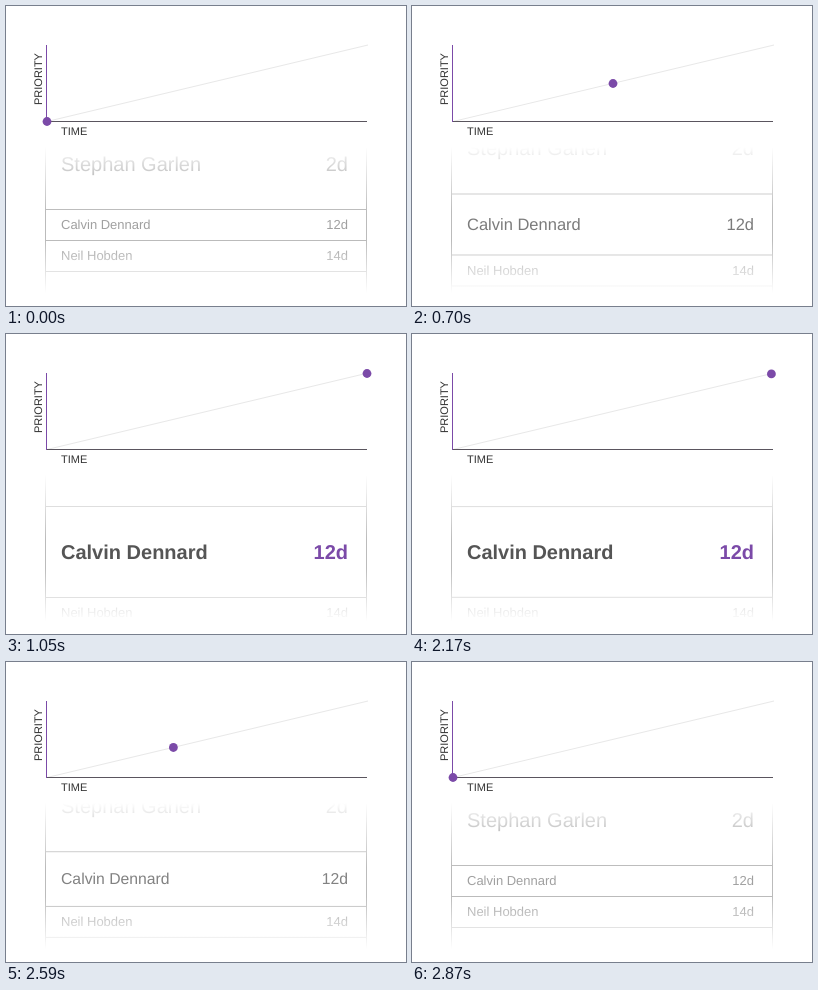
Recreate the animation shown at these times as an HTML page. Size 400 by 300 pixels, loop 3.57 s.

```html
<!DOCTYPE html>
<html lang="en">
<head>
<meta charset="utf-8">
<title>Priority over time</title>
<style>
  html, body { margin: 0; width: 100%; height: 100%; overflow: hidden; background: #fff; }
  svg { display: block; width: 100%; height: 100%; }
  text { font-family: "Liberation Sans", Arial, Helvetica, sans-serif; text-rendering: geometricPrecision; }
  .axis { font-size: 11px; fill: #333; }
  .rule { stroke: #bbb; }
  .value { text-anchor: end; }
</style>
</head>
<body>
<svg viewBox="0 0 400 300">
  <defs>
    <linearGradient id="fade" gradientUnits="userSpaceOnUse" x1="0" y1="141" x2="0" y2="287">
      <stop offset="0" stop-color="#000"/>
      <stop offset=".44" stop-color="#fff"/>
      <stop offset=".64" stop-color="#fff"/>
      <stop offset="1" stop-color="#000"/>
    </linearGradient>
    <mask id="window" maskUnits="userSpaceOnUse" x="0" y="141" width="400" height="146" style="mask-type: luminance; color-interpolation: sRGB">
      <rect y="141" width="400" height="146" fill="url(#fade)"/>
    </mask>
  </defs>

  <path d="M41 115.5L362 39" stroke="#e8e8e8"/>
  <path d="M40 115.5H361" stroke="#5a555e"/>
  <path d="M40.5 39V116" stroke="#7b4aa8"/>
  <text class="axis" x="55" y="129">TIME</text>
  <text class="axis" transform="translate(36 99) rotate(-90)">PRIORITY</text>
  <circle id="dot" r="4.4" fill="#7b4aa8"/>

  <g id="list" mask="url(#window)">
    <path class="rule" d="M39.5 141V287M360.5 141V287"/>
  </g>
</svg>
<script>
  const LOOP = 3570, TICK = 70, RAMP = 700;
  const RISE = 350, FALL = 2166.5;
  const PURPLE = '#7b4aa8';
  const list = document.getElementById('list');
  const dot = document.getElementById('dot');

  const clamp = v => Math.min(1, Math.max(0, v));
  const mix = (a, b, p) => a + (b - a) * p;
  const gray = v => `rgb(${v},${v},${v})`;

  function add(name, attrs, text = '') {
    const el = document.createElementNS('http://www.w3.org/2000/svg', name);
    set(el, attrs);
    el.textContent = text;
    return list.appendChild(el);
  }

  function set(el, attrs) {
    for (const key in attrs) el.setAttribute(key, attrs[key]);
  }

  function makeRow(name, days) {
    return {
      name: add('text', { x: 55 }, name),
      days: add('text', { x: 342, class: 'value' }, days),
      rule: add('path', { class: 'rule' })
    };
  }

  function placeRow(row, top, bottom, size, color, active = false) {
    const style = {
      y: (top + bottom) / 2 - 0.2 + size * 0.35,
      'font-size': size,
      'font-weight': active ? 700 : 400,
      fill: color
    };
    set(row.name, style);
    set(row.days, { ...style, fill: active ? PURPLE : color });
    set(row.rule, { d: `M40 ${bottom}H360` });
  }

  const previous = makeRow('Stephan Garlen', '2d');
  const current = makeRow('Calvin Dennard', '12d');
  const next = makeRow('Neil Hobden', '14d');

  function draw(time) {
    const t = Math.floor(time % LOOP / TICK) * TICK;
    const falling = t > FALL;
    const p = falling ? 1 - clamp((t - FALL) / RAMP) : clamp((t - RISE) / RAMP);

    // The list rides slightly higher on the way back.
    const lift = falling ? 6.4 * p * (1 - p) : 0;
    const top = mix(203.5, 172.5, p) - lift;
    const bottom = mix(234.5, 263.5, p) - lift;

    set(dot, { cx: mix(41, 361, p), cy: mix(115.5, 39.5, p) });
    placeRow(previous, top - 91, top, 20, gray(119));
    placeRow(current, top, bottom, mix(13, 20, p), gray(Math.round(mix(160, 85, p))), p > 0.75);
    placeRow(next, bottom, bottom + 31, 13, gray(160));
  }

  const start = performance.now();
  function frame() {
    draw(performance.now() - start);
    requestAnimationFrame(frame);
  }
  frame();
</script>
</body>
</html>
```
